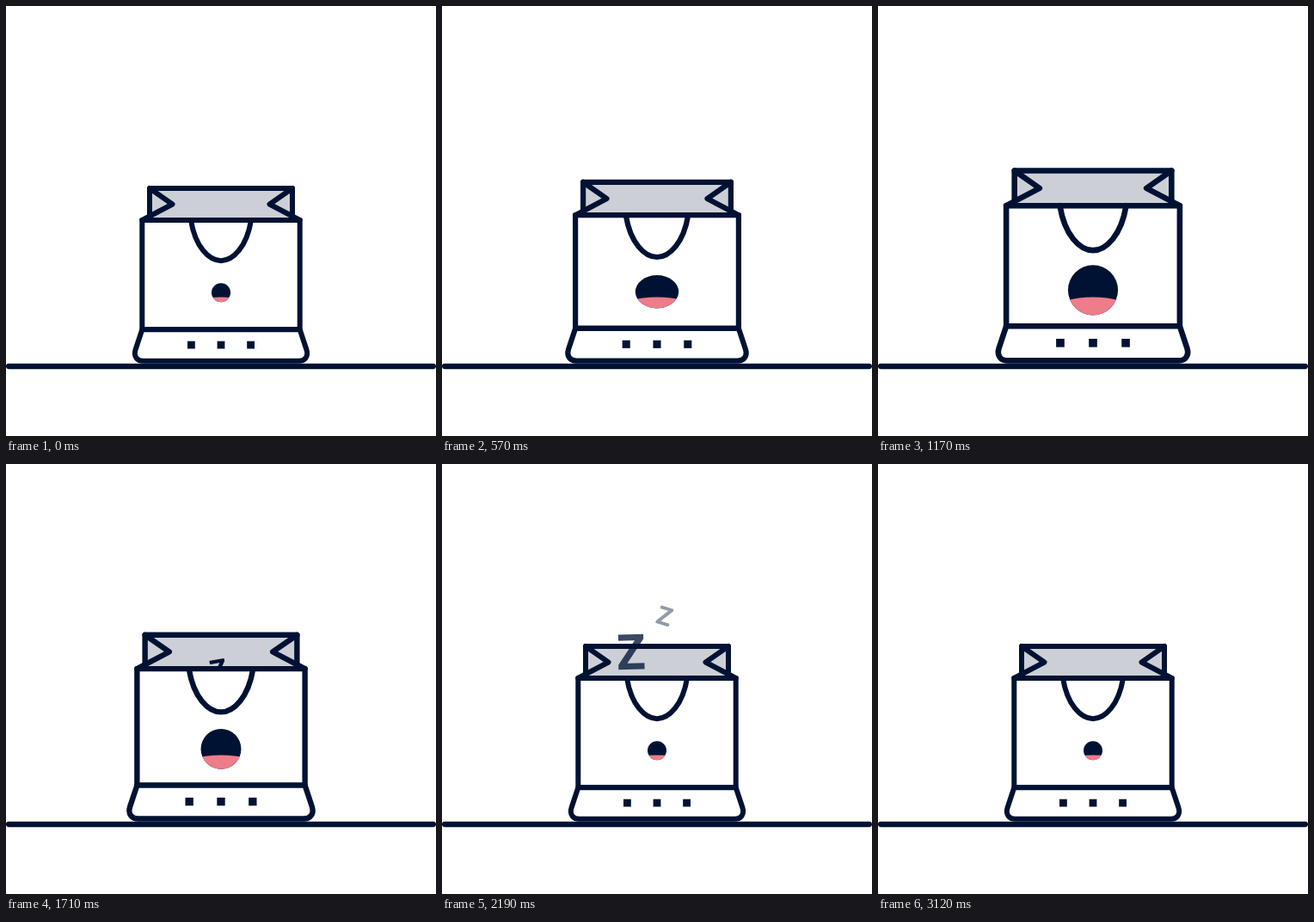
Write an HTML page with a canvas that moves like this. It is 500 px wide and 500 px high and loops after 3540 ms.

```html
<!DOCTYPE html>
<html lang="en">
<head>
<meta charset="utf-8">
<title>Yawning bag</title>
<style>
  html, body { margin: 0; width: 100%; height: 100%; overflow: hidden; background: #fff; }
  canvas { display: block; width: 100vw; height: 100vh; }
</style>
</head>
<body>
<canvas id="stage" width="500" height="500"></canvas>
<script>
const ctx = document.getElementById('stage').getContext('2d');
const LOOP = 3540;
const INK = '#001233', GREY = '#ccd0d6', PINK = '#ee7c8a';
const CX = 250, FLOOR = 417;

const clamp = v => Math.min(1, Math.max(0, v));
const mix = (a, b, k) => a + (b - a) * k;
const smooth = k => k * k * (3 - 2 * k);
const span = (t, from, to) => clamp((t - from) / (to - from));

// Slow start, straight finish: cubic-bezier(1/3, 0, 5/6, 5/6)
function easeIn(x) {
  let lo = 0, hi = 1;
  for (let i = 0; i < 24; i++) {
    const s = (lo + hi) / 2;
    if (s + 0.5 * s * s - 0.5 * s * s * s < x) lo = s; else hi = s;
  }
  return 2.5 * lo * lo - 1.5 * lo * lo * lo;
}

// Floating letters; each key: time, x, y, angle, size, alpha
const letters = [
  [
    [1560, 240, 260, -14, 34, 1],
    [1710, 247, 239.5, -10, 34, 1],
    [2190, 259, 177, 17, 30, 0.43],
    [2670, 230, 135, 17, 40, 0.13],
    [2880, 222, 114, 12, 42, 0]
  ],
  [
    [1740, 248, 274, -10, 54, 1],
    [2190, 220, 218.5, -1.5, 57, 0.77],
    [2670, 292, 160.5, 17, 61, 0.43],
    [3090, 264, 112, 10, 63, 0]
  ]
];

function drawLetter(keys, t) {
  const i = keys.findIndex((k, n) => n && t >= keys[n - 1][0] && t < k[0]);
  if (i < 0) return;
  const a = keys[i - 1], b = keys[i];
  const k = span(t, a[0], b[0]);
  const at = (n, f = k) => mix(a[n], b[n], f);
  const size = at(4);
  ctx.save();
  ctx.globalAlpha = at(5);
  ctx.translate(at(1, smooth(k)), at(2));
  ctx.rotate(at(3, smooth(k)) * Math.PI / 180);
  ctx.font = `700 ${size}px "Open Sans", "Noto Sans", sans-serif`;
  ctx.textAlign = 'center';
  ctx.fillStyle = INK;
  ctx.fillText('Z', 0, size * 0.357);
  ctx.restore();
}

function shape(d, fill) {
  const p = new Path2D(d);
  if (fill) { ctx.fillStyle = fill; ctx.fill(p); }
  ctx.stroke(p);
}

function inBag(scale, draw) {
  ctx.save();
  ctx.translate(CX, FLOOR);
  ctx.scale(scale, scale);
  ctx.translate(-CX, -FLOOR);
  ctx.lineWidth = 6;
  draw();
  ctx.restore();
}

function drawBack() {
  shape('M167 249V212H333V249Z', GREY);
  shape('M167 212L193.5 230.5L158.3 249');
  shape('M333 212L306.5 230.5L341.7 249');
}

function drawFront() {
  shape('M158.3 249H341.7V376.3H158.3Z', '#fff');
  shape('M158.3 376.3L150.6 399.5C148 407.5 152.5 412.8 159.5 412.8' +
        'H340.5C347.5 412.8 352 407.5 349.4 399.5L341.7 376.3Z', '#fff');
  shape('M215 249C220 280 236 296.2 250 296.2S280 280 285 249');
  ctx.fillStyle = INK;
  for (const x of [-34.6, 0, 34.6]) ctx.fillRect(CX + x - 4.4, 389.7, 8.8, 8.8);
}

function drawMouth(rx, ry, cy) {
  ctx.save();
  ctx.beginPath();
  ctx.ellipse(CX, cy, rx, ry, 0, 0, 7);
  ctx.fillStyle = INK;
  ctx.fill();
  ctx.clip();
  ctx.beginPath();
  ctx.ellipse(CX, 351.4, 42, 13, 0, 0, 7);
  ctx.fillStyle = PINK;
  ctx.fill();
  ctx.restore();
}

function draw(t) {
  const rise = span(t, 0, 1170);
  const breath = t < 1470 ? easeIn(rise) : 1 - smooth(span(t, 1470, 2070));
  const close = 1 - smooth(span(t, 1500, 2100));
  const wide = t < 1500 ? 1 - (1 - rise) ** 3 : close;
  const tall = t < 1500 ? rise : close;
  const scale = 1 + 0.1 * breath;

  ctx.fillStyle = '#fff';
  ctx.fillRect(0, 0, 500, 500);
  ctx.strokeStyle = INK;
  ctx.lineCap = ctx.lineJoin = 'round';

  ctx.lineWidth = 6.5;
  shape('M3.2 418.9H496.8');
  inBag(scale, drawBack);
  letters.forEach(keys => drawLetter(keys, t));
  inBag(scale, drawFront);
  drawMouth(mix(11, 26.4, wide) * scale, mix(11, 26.4, tall) * scale, 333.2 - 2.8 * breath);
}

const start = performance.now();
function tick() {
  draw((performance.now() - start) % LOOP);
  requestAnimationFrame(tick);
}
tick();
</script>
</body>
</html>
```
